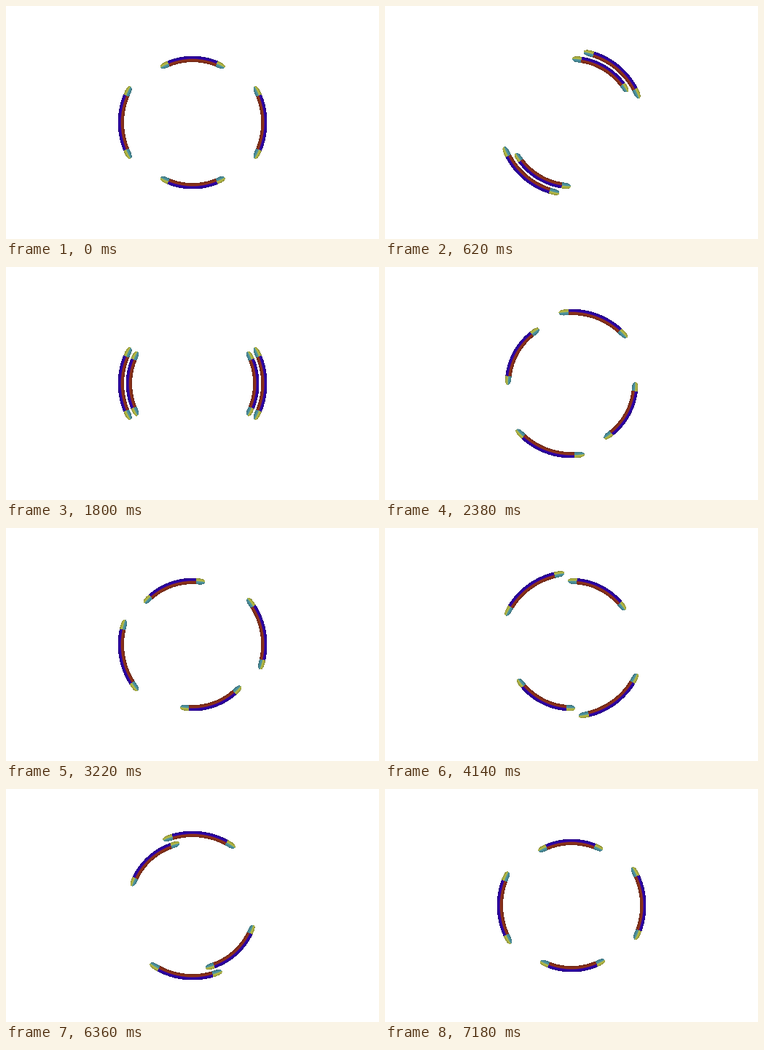
An HTML page with a canvas for the animation above (7200 ms loop, 512 px wide and 320 px high).

```html
<!DOCTYPE html>
<html lang="en">
<head>
<meta charset="utf-8">
<title>Orbiting arcs</title>
<style>
  html, body { margin: 0; width: 100%; height: 100%; overflow: hidden; background: #fff; }
  canvas { display: block; }
</style>
</head>
<body>
<canvas id="stage" width="512" height="320"></canvas>
<script>
const W = 512, H = 320, CX = 256.1, CY = 160.1;
const ctx = document.getElementById('stage').getContext('2d');
const image = ctx.createImageData(W, H);
const STEP = 20, STEPS = 360;
const BODY = 22.2, TIP = 30.3;   // half angles of tube body and cap tip, degrees
const HALF = 4.2;                // half thickness of a tube
const OUTER = 98.2, INNER = 87.2;

const RED = [142, 50, 26], PURPLE = [46, 0, 172];
const TEAL = [78, 150, 164], YELLOW = [180, 184, 68];

// Every pixel near one of the two rings, in polar form
const ringPixels = [];
for (let y = 0; y < H; y++) {
  for (let x = 0; x < W; x++) {
    const dx = x + 0.5 - CX, dy = y + 0.5 - CY, r = Math.hypot(dx, dy);
    for (const ring of [INNER, OUTER]) {
      if (Math.abs(r - ring) <= HALF) {
        const angle = Math.atan2(dy, dx) * 180 / Math.PI;
        ringPixels.push({ at: (y * W + x) * 4, angle, offset: r - ring, ring });
      }
    }
  }
}

const clamp = v => Math.max(0, Math.min(1, v));

// Distance in degrees to the nearer of two opposite arc centres
function distance(angle, turn) {
  const d = (((angle - turn) % 180) + 180) % 180;
  return Math.min(d, 180 - d);
}

function paint(at, offset, away) {
  const cap = away > BODY;
  const u = cap ? (away - BODY) / (TIP - BODY) : 0;
  const width = Math.sqrt(1 - u ** 4);
  const mid = cap ? 0.6 : 0;
  const side = offset - mid;
  const edge = side / (width * (side > 0 ? HALF - mid : HALF + mid));
  if (!(Math.abs(edge) <= 1)) return;

  const shade = 0.6 + 0.4 * Math.sqrt(1 - edge * edge);
  const mix = clamp((offset + 0.5) / 1.4);
  const from = cap ? TEAL : RED, to = cap ? YELLOW : PURPLE;
  for (let c = 0; c < 3; c++) {
    image.data[at + c] = shade * (from[c] + (to[c] - from[c]) * mix);
  }
}

function draw(turn) {
  const outerSpeed = turn < 180 ? 10 : 2;   // fast half, then slow half
  image.data.fill(255);
  for (const { at, angle, offset, ring } of ringPixels) {
    const away = distance(angle, ring === OUTER ? turn * outerSpeed : turn + 90);
    if (away < TIP) paint(at, offset, away);
  }
  ctx.putImageData(image, 0, 0);
}

const start = performance.now();
function tick() {
  draw(Math.floor((performance.now() - start) / STEP) % STEPS);
  requestAnimationFrame(tick);
}
tick();
</script>
</body>
</html>
```
